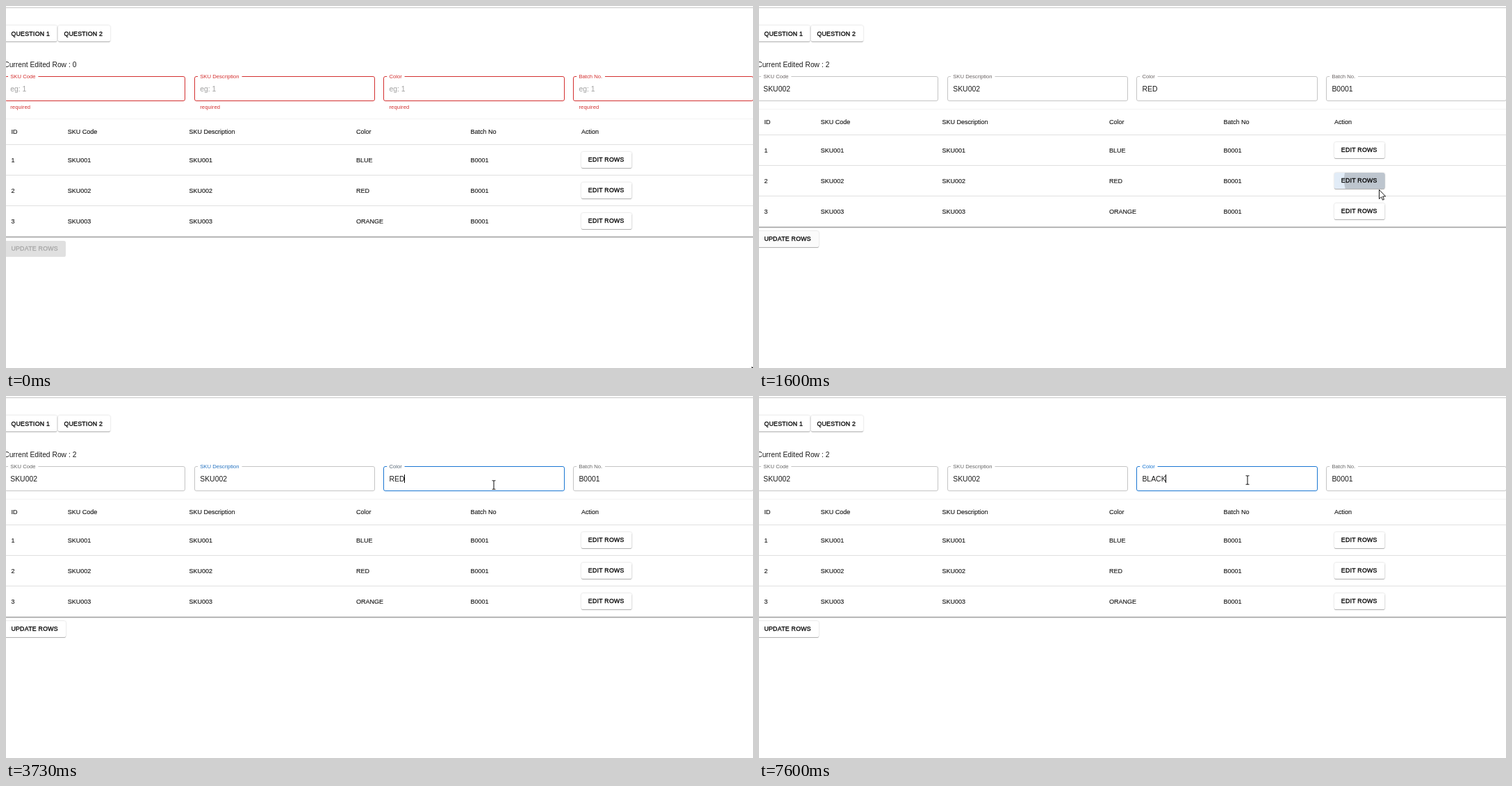
An HTML page for the animation above (8 s loop, 1075x521 px).

```html
<!DOCTYPE html>
<html lang="en">
<head>
<meta charset="utf-8">
<title>Row editor</title>
<style>
  html, body { margin: 0; width: 100%; height: 100%; overflow: hidden; background: #fff; }
  svg { display: block; width: 1075px; height: 521px; }
  text { font-family: "Liberation Sans", Arial, sans-serif; fill: #1c1c1c; white-space: pre; }
  .title { font-size: 10.3px; }
  .body { font-size: 10.45px; }
  .cell { font-size: 9px; stroke: #1c1c1c; stroke-width: .15px; }
  .button { font-size: 8.8px; letter-spacing: .25px; fill: #000; stroke: #000; stroke-width: .3px; }
  .disabled { fill: #a6a6a6; stroke: #a6a6a6; }
  .label { font-size: 7.7px; }
  .help { font-size: 7.7px; letter-spacing: .1px; fill: #d32f2f; }
  .raised { filter: drop-shadow(0 1px .4px rgba(0,0,0,.24)) drop-shadow(0 .6px 1.1px rgba(0,0,0,.2)); }
  .line { shape-rendering: crispEdges; }
</style>
</head>
<body>
<svg id="stage" viewBox="0 0 1075 521"></svg>
<script>
const LOOP = 8000, FPS = 15;
const HOVER = 904, PRESS = 1340, EDIT = 1450;
const FOCUS_DESC = 3050, FOCUS_COLOR = 3690, SELECT = 6050;
const RED = [211, 47, 47], BLUE = [25, 118, 210], DARK_BLUE = [21, 101, 192];
const GREY = [102, 102, 102], WHITE = [255, 255, 255], DISABLED = [224, 224, 224];

const FIELDS = [
  { label: 'SKU Code', left: -2, right: 257, text: 6.2, value: 'SKU002' },
  { label: 'SKU Description', left: 271, right: 530, text: 279.2, value: 'SKU002' },
  { label: 'Color', left: 543, right: 803, text: 551.4, value: 'RED' },
  { label: 'Batch No.', left: 816, right: 1075, text: 824.4, value: 'B0001' }
];
const COLUMNS = [7.4, 88.8, 263.6, 504, 668.4, 828];
const HEADER = ['ID', 'SKU Code', 'SKU Description', 'Color', 'Batch No', 'Action'];
const ROWS = ['BLUE', 'RED', 'ORANGE'].map((color, i) =>
  [i + 1, 'SKU00' + (i + 1), 'SKU00' + (i + 1), color, 'B0001']);

// Pointer hotspot: time, x, y
const PATH = [
  [0, 1073, 519], [300, 1000, 392], [600, 925, 292], [867, 902, 265], [933, 892, 264],
  [2133, 892, 264], [2267, 620, 290], [2400, 268, 322], [2600, 104, 300], [2800, 290, 190],
  [3000, 390, 124], [3467, 390, 124], [3667, 690, 128], [3733, 702, 128], [4067, 702, 128],
  [4267, 701, 127], [4600, 701, 127], [4800, 703, 121]
];
const TYPED = [6850, 7050, 7250, 7450, 7590];

const stage = document.getElementById('stage');
const measure = document.createElement('canvas').getContext('2d');
const clamp = v => Math.min(1, Math.max(0, v));
const mixed = (a, b, p) => a.map((v, i) => v + (b[i] - v) * p);
const mix = (a, b, p) => `rgb(${mixed(a, b, p).map(Math.round)})`;

// cubic-bezier(.4, 0, .2, 1)
function ease(p) {
  p = clamp(p);
  let lo = 0, hi = 1;
  for (let i = 0; i < 18; i++) {
    const u = (lo + hi) / 2, v = 1 - u;
    if (1.2 * u * v * v + .6 * u * u * v + u ** 3 < p) lo = u; else hi = u;
  }
  return 3 * lo * lo * (1 - lo) + lo ** 3;
}

function widthOf(str, size) {
  measure.font = '100px "Liberation Sans", Arial, sans-serif';
  return measure.measureText(str).width * size / 100;
}

const text = (cls, x, y, str, extra = '') => `<text class="${cls}" x="${x}" y="${y}" ${extra}>${str}</text>`;
const rect = (x, y, w, h, extra) => `<rect x="${x}" y="${y}" width="${w}" height="${h}" ${extra}/>`;
const rule = (y, color) => rect(0, y, 1075, 1, `class="line" fill="${color}"`);
const button = (x, y, w, fill = '#fff', cls = 'raised') =>
  rect(x, y, w, 23, `rx="2.6" fill="${fill}" class="${cls}"`);

function pointerAt(t) {
  const i = PATH.findIndex(p => p[0] > t);
  if (i < 0) return PATH[PATH.length - 1].slice(1);
  const [t0, ...from] = PATH[i - 1], [t1, ...to] = PATH[i];
  return mixed(from, to, (t - t0) / (t1 - t0)).map(Math.round);
}

const fieldAt = ([x, y]) => y > 100 && y < 137 ? FIELDS.findIndex(f => x >= f.left && x <= f.right) : -1;

function focusAmount(i, t) {
  if (i === 1) return ease((t - FOCUS_DESC) / 200) - ease((t - FOCUS_COLOR) / 200);
  return i === 2 ? ease((t - FOCUS_COLOR) / 200) : 0;
}

function field(f, i, t, hovered) {
  const editing = t >= EDIT;
  const focused = i === 1 ? t >= FOCUS_DESC && t < FOCUS_COLOR : i === 2 && t >= FOCUS_COLOR;
  const border = !editing ? '#d32f2f' : focused ? '#1976d2' : hovered ? '#212121' : '#c4c4c4';
  const base = mixed(RED, GREY, ease((t - EDIT) / 200));
  const typed = i === 2 ? TYPED.filter(time => t >= time).length : 0;
  const value = typed ? 'BLACK'.slice(0, typed) : f.value;
  const end = widthOf(value, 10.45);
  const selected = i === 2 && t >= SELECT && !typed;

  let out = rect(f.left + .5, 101.5, f.right - f.left, 35, `rx="2.4" fill="none" stroke="${border}"`)
    + rect(f.text - 3.2, 100, widthOf(f.label, 7.7) + 7, 3, 'fill="#fff"')
    + text('label', f.text, 103.7, f.label, `style="fill:${mix(base, BLUE, focusAmount(i, t))}"`);
  if (!editing) {
    return out + text('body', f.text, 123, 'eg: 1', 'style="fill:#a2a2a2"') + text('help', f.text, 147.7, 'required');
  }
  if (selected) out += rect(f.text, 113, end, 12, 'fill="#3390ff"');
  out += text('body', f.text, 123, value, selected ? 'style="fill:#fff"' : '');

  const since = t - (typed ? TYPED[typed - 1] : i === 1 ? FOCUS_DESC : FOCUS_COLOR);
  if (focused && !selected && Math.floor(since / 530) % 2 === 0) {
    out += rect(Math.floor(f.text + end), 113, 1, 12, 'fill="#000"');
  }
  return out;
}

function ripple(t) {
  if (t < PRESS) return '';
  const grow = ease((t - PRESS) / 550);
  const alpha = (.1 + .2 * grow) * (1 - ease((t - 1440) / 550));
  return `<circle cx="892" cy="264" r="${67.7 * grow}" opacity="${alpha}" clip-path="url(#press)"/>`;
}

function table(t) {
  const hover = ease((t - HOVER) / 250) - ease((t - EDIT) / 250);
  const on = ease((t - EDIT) / 250);
  let out = rule(162, '#f3f3f3') + rule(331, '#dcdcdc') + rule(332, '#a4a4a4') + rule(333, '#e6e6e6');
  out += HEADER.map((str, i) => text('cell', COLUMNS[i], 184, str)).join('') + rule(199, '#e0e0e0');
  ROWS.forEach((row, r) => {
    const y = 44 * r;
    out += row.map((str, i) => text('cell', COLUMNS[i], 225 + y, str)).join('');
    out += button(828, 210 + y, 72.5, r === 1 ? mix(WHITE, DARK_BLUE, hover) : '#fff');
    if (r === 1) out += ripple(t);
    out += text('button', 837.8, 224 + y, 'EDIT ROWS');
    if (r < 2) out += rule(243 + y, '#e0e0e0');
  });
  return out + button(-4, 338, 90, mix(DISABLED, WHITE, on), t >= EDIT ? 'raised' : '')
    + text(t >= EDIT ? 'button' : 'button disabled', 7.4, 352, 'UPDATE ROWS');
}

const CURSORS = {
  arrow: '<path d="M.5 .5V13.6L3.5 10.8L5.5 15.2L7.5 14.3L5.6 10H9.7Z" fill="#fff" stroke="#000" stroke-width=".9"/>',
  hand: '<path d="M-1.3 10.5V1.8Q-1.3 .5 0 .5T1.3 1.8V6.3Q1.6 5.5 2.6 5.6T3.9 7Q4.2 6.2 5.1 6.4T6.3 7.8Q7 7 7.8 7.6T8.4 9V12.5Q8.4 14.5 7.2 16V17.7H.2V16.2L-4.4 11.2Q-5.5 9.6-4.4 8.9T-2.4 9.4Z" fill="#fff" stroke="#000" stroke-width=".95" stroke-linejoin="round"/><path d="M1.5 6.5V10M3.9 7.2V10M6.2 8V10.2" stroke="#000" stroke-width=".8"/>',
  beam: '<path d="M-2.5-6.2H-.8L0-5.6L.8-6.2H2.5M0-5.6V5.6M-2.5 6.2H-.8L0 5.6L.8 6.2H2.5" fill="none" stroke="#222" stroke-width="1.1"/>'
};

function draw(t) {
  const pointer = pointerAt(t), over = fieldAt(pointer);
  const kind = over >= 0 ? 'beam' : t >= HOVER && t < EDIT ? 'hand' : 'arrow';
  stage.innerHTML = `<defs><clipPath id="press">${rect(828, 254, 72.5, 23, 'rx="2.6"')}</clipPath></defs>`
    + rule(2, '#c6c6c6')
    + button(-4, 28, 77.5) + text('button', 7.4, 43, 'QUESTION 1')
    + button(75, 28, 75) + text('button', 83.4, 43, 'QUESTION 2')
    + text('title', -2.8, 88, 'Current Edited Row : ' + (t >= EDIT ? 2 : 0))
    + FIELDS.map((f, i) => field(f, i, t, i === over)).join('')
    + `<g transform="translate(0 ${t >= EDIT ? -14 : 0})">${table(t)}</g>`
    + `<g transform="translate(${pointer})">${CURSORS[kind]}</g>`;
}

const start = performance.now();
let shown = -1;
function tick() {
  const t = (performance.now() - start) % LOOP;
  const step = Math.floor((t + 3.5) * FPS / 1000) % (LOOP * FPS / 1000);
  if (step !== shown) draw((shown = step) * 1000 / FPS);
  requestAnimationFrame(tick);
}
tick();
</script>
</body>
</html>
```
